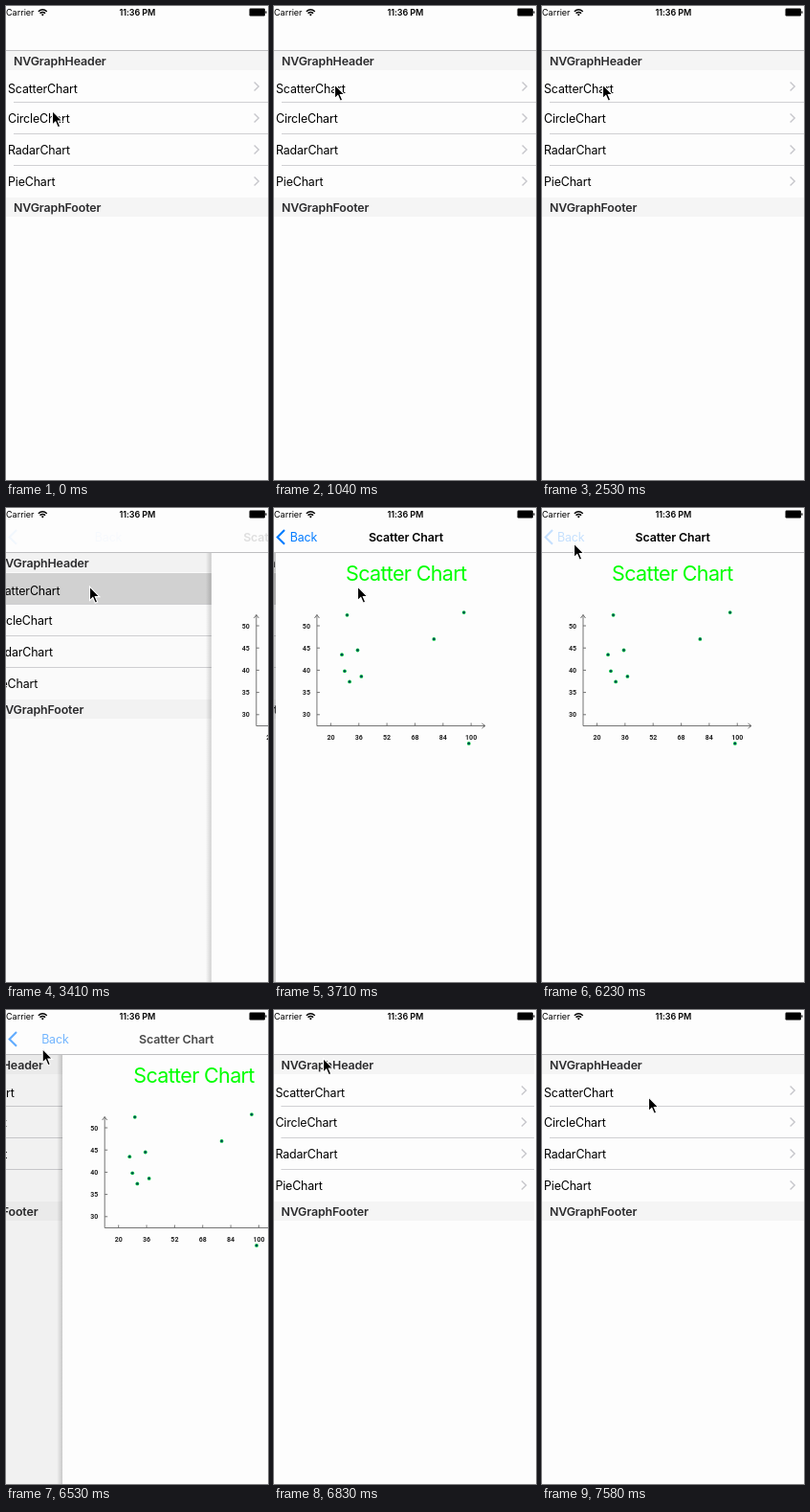
An HTML page for the animation above (8000 ms loop, 274 px wide and 495 px high).

```html
<!DOCTYPE html>
<html lang="en">
<head>
<meta charset="utf-8">
<title>Chart list</title>
<style>
  html, body { margin: 0; width: 100%; height: 100%; overflow: hidden; background: #fdfdfd; }
  svg { display: block; width: 274px; height: 495px; }
  text { font: 12.4px Inter, sans-serif; white-space: pre; }
  .row { letter-spacing: -.011em; }
  .bold { font-weight: 600; letter-spacing: -.01em; }
  .mid { text-anchor: middle; }
  .status { font-size: 9px; }
  .head { fill: #2b2b2d; }
  .big { font-size: 21.5px; letter-spacing: -.03em; fill: #0f0; }
  .tick text { font: 700 7px Roboto, sans-serif; fill: #222; }
  .line { fill: none; stroke: #666; stroke-width: .9; }
  .more { fill: none; stroke: #c7c7cc; stroke-width: 1.4; }
</style>
</head>
<body>
<svg viewBox="0 0 274 495">
  <defs>
    <linearGradient id="edge">
      <stop offset="0" stop-opacity="0"/>
      <stop offset="1" stop-opacity=".17"/>
    </linearGradient>
  </defs>

  <g id="list">
    <rect width="360" height="495" fill="#fdfdfd"/>
    <rect y="47" width="274" height="20" fill="#f5f5f5"/>
    <rect y="200" width="274" height="20" fill="#f5f5f5"/>
    <rect id="pick" y="68" width="274" height="33" fill="#d3d3d3"/>
    <text class="bold head" x="8" y="62.3">NVGraphHeader</text>
    <text class="bold head" x="8" y="215.3">NVGraphFooter</text>
    <g id="rows"></g>
  </g>
  <rect id="dim" y="47" width="274" height="448"/>

  <g id="chart">
    <rect id="shadow" x="-6" y="47" width="6" height="448" fill="url(#edge)"/>
    <rect width="274" height="495" fill="#fdfdfd"/>
    <g id="plot">
      <text class="big mid" x="136.3" y="76">Scatter Chart</text>
      <path class="line" d="M43 227.5V111.5M40.5 115L43 111.5L45.5 115M43 227.5H219M215.5 225L219 227.5L215.5 230"/>
      <g id="ticks" class="tick"></g>
      <g id="dots"></g>
    </g>
  </g>

  <rect width="274" height="46" fill="#fdfdfd"/>
  <rect y="46" width="274" height="1" fill="#bfbfc1"/>
  <g id="back" fill="#007aff">
    <path id="arrow" d="M11 23L3.6 30.4L11 37.8" fill="none" stroke="#007aff" stroke-width="2.1"/>
    <text id="label" class="row" x="16" y="35">Back</text>
  </g>
  <text id="title" class="bold mid" x="136.7" y="35">Scatter Chart</text>

  <text class="status" x="0" y="9.8">Carrier</text>
  <path d="M33.8 5.7Q38.3 1.9 42.8 5.7M35.5 7.6Q38.3 5.2 41.1 7.6" fill="none" stroke="#000" stroke-width="1.4"/>
  <path d="M36.8 8.8Q38.3 7.6 39.8 8.8L38.3 10.4Z"/>
  <text class="status bold mid" x="137.4" y="9.8">11:36 PM</text>
  <rect x="254.5" y="2.6" width="16.4" height="7.8" rx="1.2"/>
  <rect x="271.3" y="5.2" width="1.2" height="2.6" rx=".6"/>

  <path id="cursor" d="M0 0V14.6L3.3 11.5L5.8 17.2L8.2 16.2L5.8 10.6H10.4Z" stroke="#fff" stroke-width="1.1"/>
</svg>
<script>
const $ = id => document.getElementById(id);
const LOOP = 8000, STEP = 148;
const TAP = 42, PUSH = 22.72, POP = 43.72; // in steps

const rows = ['ScatterChart', 'CircleChart', 'RadarChart', 'PieChart'];
$('rows').innerHTML = rows.map((name, i) => {
  const y = 84 + 33 * i;
  const base = i ? y + 4.5 : 90.5;
  const rule = i < 3 ? `<rect x="8" y="${y + 16}" width="266" height="1" fill="#d0d0d3"/>` : '';
  return `<text class="row" x="2" y="${base}">${name}</text>${rule}
    <path class="more" d="M259.6 ${y - 4.4}l4.6 4.4l-4.6 4.4"/>`;
}).join('');

// chart values to pixels
const px = v => 57.5 + (v - 20) * 1.834;
const py = v => 123 + (50 - v) * 4.64;

let ticks = '';
for (let v = 50; v >= 30; v -= 5) {
  ticks += `<path class="line" d="M43 ${py(v)}h3"/><text x="36" y="${py(v) + 2.6}" text-anchor="end">${v}</text>`;
}
for (let v = 20; v <= 100; v += 16) {
  ticks += `<path class="line" d="M${px(v)} 227.5v-3"/><text class="mid" x="${px(v)}" y="241.6">${v}</text>`;
}
$('ticks').innerHTML = ticks;

const data = [[29.3, 52.4], [26.3, 43.5], [35.3, 44.5], [27.9, 39.8], [30.7, 37.4],
  [37.4, 38.6], [78.8, 47], [95.9, 53], [98.7, 23.5]];
const dot = (x, y, r, fill) => `<circle cx="${x}" cy="${y}" r="${r}" fill="${fill}"/>`;
$('dots').innerHTML = data.map(([x, y]) =>
  dot(px(x), py(y), 1.9, '#00c83c') + dot(px(x), py(y), 1.15, '#023a5c')).join('');

// pointer moves: first step, last step, end point
const home = [48.5, 109.5];
const moves = [
  [5, 7, 63.5, 82], [17, 21, 87.5, 82], [26, 30, 86, 165.5], [35, 40, 33.5, 37],
  [43, 46, 51.5, 50.5], [46, 47, 95, 109], [48, 51, 111.5, 91]
];

function ease(from, to, n) {
  const u = Math.min(1, Math.max(0, (n - from) / (to - from)));
  return u * u * (3 - 2 * u);
}

function pointer(n) {
  return moves.reduce(([x, y], [from, to, tx, ty]) => {
    const u = ease(from, to, n);
    return [x + (tx - x) * u, y + (ty - y) * u];
  }, home);
}

// critically damped spring, 0 to 1
function spring(n) {
  if (n <= 0) return 0;
  if (n > 3) return 1;
  const w = 3.1 * n;
  return 1 - (1 + w) * Math.exp(-w);
}

const move = (id, x, y = 0) => $(id).setAttribute('transform', `translate(${x} ${y})`);
const fade = (id, a) => $(id).setAttribute('opacity', a);

function render(now) {
  const n = Math.floor(now % LOOP / STEP);
  const p = spring(n - PUSH) - spring(n - POP), q = 1 - p;
  move('cursor', ...pointer(n));
  move('list', -84 * p);
  move('chart', 274 * q);
  move('plot', 5 * q);
  move('label', 98 * q);
  move('title', 192 * q);
  fade('chart', p > 0 ? 1 : 0);
  fade('shadow', Math.min(1, 5 * p));
  fade('dim', .06 * p);
  fade('pick', n > PUSH && n < PUSH + 4 ? 1 : 0);
  fade('arrow', p ** 2);
  fade('label', p ** 2.5);
  fade('title', p ** 1.4);
  fade('back', n >= TAP && n < POP ? .22 : 1);
}

const start = performance.now();
function tick() {
  render(performance.now() - start);
  requestAnimationFrame(tick);
}
tick();
</script>
</body>
</html>
```
